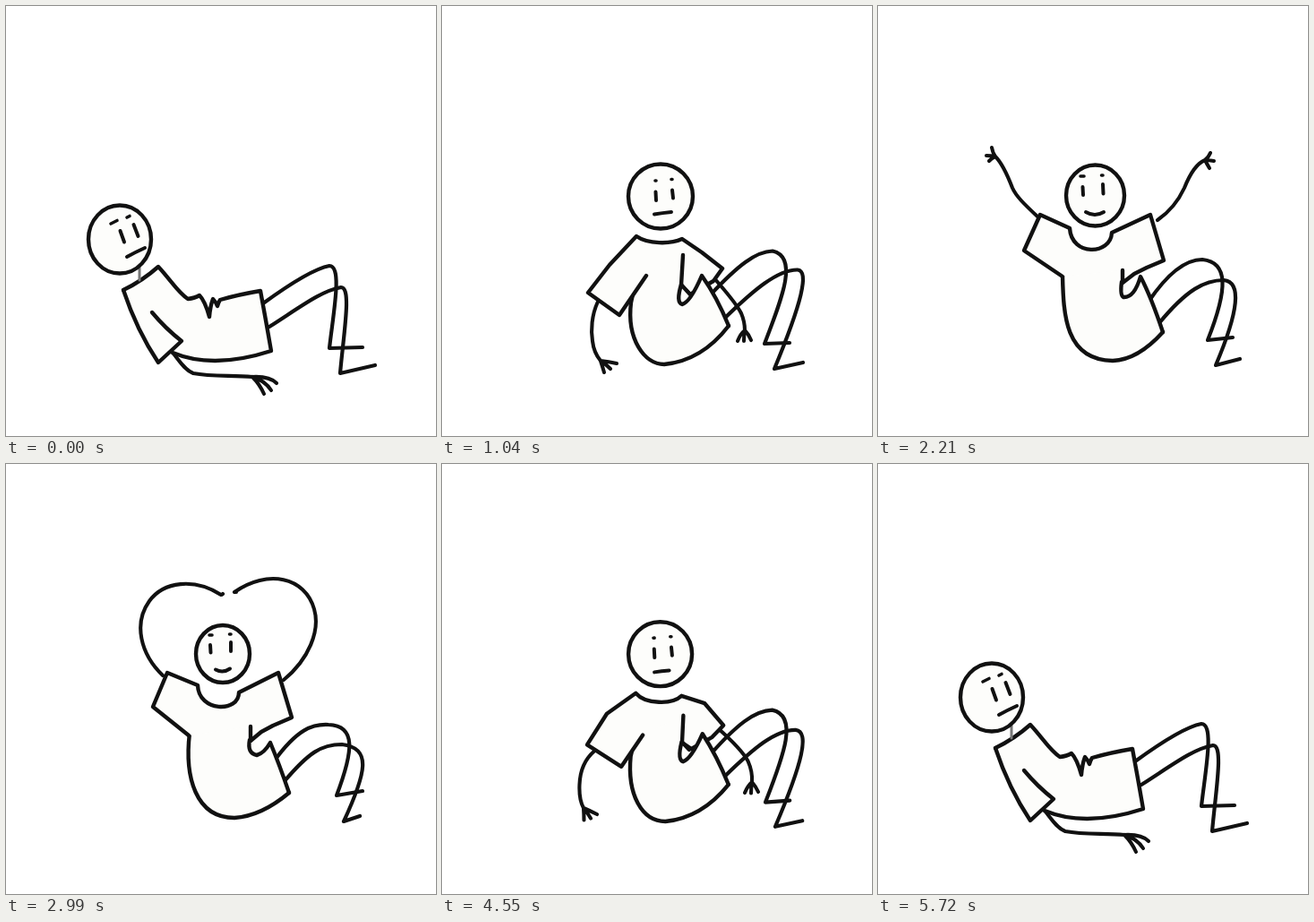
Recreate the animation shown at these times as an HTML page. Size 480x480 px, loop 5.85 s.

```html
<!DOCTYPE html>
<html lang="en">
<head>
<meta charset="utf-8">
<title>Sit-up heart</title>
<style>
html, body { margin: 0; width: 100%; height: 100%; overflow: hidden; background: #fff; }
svg { display: block; width: 100vw; height: 100vh; filter: blur(0.55px); }
path { fill: none; stroke: #111; stroke-width: 4.4; stroke-linecap: round; stroke-linejoin: round; }
.cloth { fill: #fdfdfb; }
</style>
</head>
<body>
<svg id="stage" viewBox="0 0 480 480"></svg>
<script>
const STEP = 130, CELS = 45, TOP = 22;

// Each part: path shapes by cel of the rising half; shapes of a part share one structure.
const parts = [
  { w: 4.2, keys: { // far leg
    0: "M287 332C320 308 345 293 361 290C376 290 365 345 361 382L398 381",
    5: "M303 318C325 292 345 281 364 282C388 286 376 330 358 377L394 377",
    8: "M300 322C330 290 350 274 369 273.5C398 280 380 325 360 377L388 376",
    13: "M303 327C325 296 345 280 367 279C397 284 390 320 365 380L389 374",
    17: "M302 330C325 296 345 283 362 283C391 286 391 315 368 373L396 370",
    21: "M299 332C325 296 342 290 360 291C391 292 388 320 369 370L398 365" } },
  { w: 4.2, keys: { // near leg
    0: "M294 358C330 335 352 318 374 314C386 314 377 365 373 410L412 401",
    5: "M314 344C345 328 360 310 382 312C404 316 394 345 375 403L405 397",
    8: "M315 349C348 317 375 294 397 294.5C410 296 402 330 371 405L403 398",
    13: "M314 351C345 320 362 306 386 306C413 310 405 345 376 404L399 399",
    17: "M313 355C345 316 365 306 386 306C406 308 403 340 377 401L404 394",
    21: "M310 355C338 322 352 313 375 313C409 317 402 345 377 399L395 393" } },
  { w: 4.1, keys: { // left arm and fingers
    0: "M186 387C193 395 199 406 209 410C230 414 252 412 275 414Q294 413 302 421M275 414Q289 418 296 429M275 414Q283 422 288 433",
    5: "M219 362C220 375 219 390 222 403C226 414 245 413 256 413Q265 412 272 411M256 413Q268 415 274 418M256 413Q260 419 266 423",
    8: "M174 330C167 345 166 362 168 374C169 383 172 390 177 396Q186 397 195 399M177 396Q183 400 188 405M177 396Q179 402 181 409",
    10: "M166 311C152 314 142 325 139 342C137 355 137 365 139 372Q144 377 151 383M139 372Q142 379 144 386M139 372Q138 379 136 386",
    13: "M163 260C152 251 138 244 126 244C112 252 111 275 112 297Q118 309 127 319M112 297Q115 309 119 321M112 297Q110 309 110 322",
    15: "M170 248C155 243 140 238 127 231C117 226 107 220 100 214Q97 208 94 206M100 214Q95 212 91 212M100 214Q97 217 94 220",
    17: "M178 235C162 220 154 212 150 203C145 190 139 176 131 168Q128 164 127 158M131 168Q126 167 121 167M131 168Q127 170 124 173",
    19: "M176 235C158 218 148 200 148 183C148 165 155 140 164 128Q166 121 167 116M164 128Q169 121 173 118M164 128Q171 125 177 123",
    21: "M175 236C150 212 142 178 160 153C176 131 210 127 240 146Q241 146 242 145M240 146Q241 146 242 145M240 146Q241 146 242 145",
    22: "M175 236C150 212 142 178 159 152C176 129 212 126 242 149Q243 149 244 148M242 149Q243 149 244 148M242 149Q243 149 244 148" } },
  { w: 4.1, keys: { // right arm and fingers, tucked behind the shirt at first
    5: "M266 346C268 348 270 349 271 350C272 352 273 354 273 356Q271 359 271 362M273 356Q273 359 274 362M273 356Q275 359 277 362",
    8: "M304 304C316 318 328 331 334 343C337 350 338 356 338 362Q333 366 330 374M338 362Q337 368 337 374M338 362Q342 366 345 373",
    10: "M311 285C326 295 342 308 349 320C354 331 355 340 354 348Q349 353 346 360M354 348Q353 355 353 361M354 348Q358 353 361 359",
    13: "M313 246C332 237 350 234 362 236C374 244 375 270 374 290Q366 296 360 302M374 290Q371 298 370 306M374 290Q377 297 378 303",
    15: "M314 243C330 238 344 232 356 226C368 220 380 214 390 208Q395 204 397 200M390 208Q397 207 402 208M390 208Q395 212 398 216",
    17: "M312 239C328 228 336 216 342 203C348 188 355 176 365 172Q369 169 371 164M365 172Q369 172 375 173M365 172Q367 176 370 181",
    19: "M311 240C332 222 344 200 345 180C345 160 338 140 330 128Q327 121 326 116M330 128Q324 121 320 118M330 128Q323 125 316 124",
    21: "M310 241C338 218 351 186 344 162C334 126 292 117 255 143Q256 143 257 143M255 143Q256 143 257 143M255 143Q256 143 257 143",
    22: "M310 241C338 218 350 186 343 162C333 124 290 116 252 146Q253 146 254 145M252 146Q253 146 254 145M252 146Q253 146 254 145" } },
  { cloth: 1, to: 5, keys: { // shirt from the side
    0: "M131 317Q152 307 170 291C184 306 192 320 203 327Q211 326 216 323Q222 329 227 347Q228 335 231 327Q234 330 236 335Q237 331 239 328Q260 322 284 318Q290 350 296 385C262 396 222 402 186 387",
    5: "M214 262Q235 266 257 262C255 290 254 320 260 334Q261 335 262 334Q263 333 264 332Q265 331 266 330Q267 329 268 328Q269 327 270 326Q281 315 292 302Q308 325 320 356C290 395 228 436 222 364" } },
  { cloth: 1, to: 5, keys: { // side sleeve
    0: "M131 317Q146 362 170 398L196 374Q178 360 163 342",
    5: "M214 262Q206 310 208 363L239 358Q239 325 235 301" } },
  { cloth: 1, from: 6, keys: { // front torso
    6: "M255 275L222 290L217 350C213 375 232 401 246 401Q283 396 320 357",
    8: "M262 272L220 290L211 331C206 372 226 400 248 400Q290 396 320 357",
    13: "M262 285L215 290L209 309C209 355 210 394 255 395Q290 390 319 361",
    17: "M262 285L215 290L206 301C207 345 209 395 262 396Q290 395 318 364",
    21: "M262 285L215 290L205 300C199 350 212 395 255 395Q285 393 316 367" } },
  { cloth: 1, from: 6, keys: { // shoulders, collar and sleeves
    6: "M233 301L222 360L196 352L206 295L215 260C228 265 248 265 262 261L272 268L288 284L284 300L272 314L262 306L263 278",
    8: "M228 301L198 345L163 320L187 289L217 257C230 266 255 266 268 260L290 275L313 293L303 307L277 322L267 312L269 278",
    13: "M209 309L209 309L158 287L172 238L214 251C215 278 266 280 265 254L306 236L319 287L296 296L284 302L272 307L271 292",
    17: "M206 302L206 302L163 273L181 233L214 248C216 280 260 278 261 253L304 233L319 284L300 292L286 299L273 309L273 295",
    21: "M204 303L204 303L164 271L180 233L214 247C215 277 260 278 260 255L304 233L319 283L298 292L285 299L273 309L273 293" } },
  { cloth: 1, from: 6, keys: { // sleeve corner, lap and hem
    6: "M272 314L261 310Q257 333 263 334Q271 329 291 301Q307 325 320 356",
    8: "M277 322L267 311Q261 331 268 333Q277 331 290 301Q307 325 320 357",
    13: "M272 307L270 306Q268 327 274 329Q282 324 294 302Q307 330 319 361",
    17: "M273 309L272 308Q270 323 274 325Q286 326 293 302Q305 325 318 364",
    21: "M273 309L272 308Q269 323 280 325Q288 323 295 311Q305 335 316 367" } },
  { w: 3, to: 2, ink: "#777", keys: { // neck
    0: "M149 290L149 306",
    5: "M236 250L236 262" } },
  { cloth: 1, keys: { // head
    0: oval(127, 260.5, 35, 38),
    5: oval(238.5, 212.5, 32, 36.5),
    8: oval(244, 212.5, 36, 36),
    13: oval(242, 211, 33.5, 35.5),
    17: oval(242.5, 211.5, 32.5, 34),
    21: oval(242, 212, 30, 32) } },
  { w: 4, keys: { // eyes
    0: "M127.5 251L132 263.5M142.5 244L147.5 257",
    5: "M244 205L245 217M257 204L258.5 216",
    8: "M238.5 207.5L239 217M257 205.5L258 214.5",
    13: "M230 203L230.5 212.5M252 201L252.5 211",
    17: "M228.5 202L229 211M251 199L251.5 209.5",
    21: "M228 202L228.5 210.5M251 199L251 209" } },
  { w: 3.6, keys: { // brows
    0: "M117 243L124 239.5M135 236L138 234.5",
    5: "M236 194L242 193.5M253 192.5L257 192",
    8: "M238 195L239 195M256 193.5L257 193.5",
    13: "M228 191L229.5 190.5M250 189.5L251.5 189.5",
    17: "M226 190L230 190M249.5 189L251 189",
    21: "M227 191L230 191M249.5 190L251 190" } },
  { w: 4, keys: { // mouth
    0: "M135 280Q144 275 155 270",
    5: "M240 234Q248 231 256 232.5",
    8: "M237 232.5Q246 231 256 230",
    13: "M237.5 232Q241 231.5 244 232",
    17: "M232 230Q242 236 252 230",
    21: "M234 229.5Q242 234 250 228.5" } }
];

function oval(x, y, rx, ry) {
  const a = rx * 0.552, b = ry * 0.552;
  return `M${x} ${y - ry}C${x + a} ${y - ry} ${x + rx} ${y - b} ${x + rx} ${y}` +
    `C${x + rx} ${y + b} ${x + a} ${y + ry} ${x} ${y + ry}` +
    `C${x - a} ${y + ry} ${x - rx} ${y + b} ${x - rx} ${y}` +
    `C${x - rx} ${y - b} ${x - a} ${y - ry} ${x} ${y - ry}Z`;
}

const NUM = /\d+(\.\d+)?/g;

function blend(a, b, t) {
  const end = b.match(NUM);
  let k = 0;
  return a.replace(NUM, n => (+n + (end[k++] - n) * t).toFixed(2));
}

function shape(keys, cel) {
  const at = Object.keys(keys).map(Number);
  const next = at.find(k => k > cel);
  const prev = at.filter(k => k <= cel).pop();
  if (prev === undefined) return keys[next];
  if (next === undefined) return keys[prev];
  let t = (cel - prev) / (next - prev);
  if (prev === 0) t = 1 - (1 - t) ** 1.5; // the sit-up slows near the top
  return blend(keys[prev], keys[next], t);
}

const stage = document.getElementById("stage");
for (const p of parts) {
  p.el = document.createElementNS("http://www.w3.org/2000/svg", "path");
  if (p.cloth) p.el.setAttribute("class", "cloth");
  if (p.w) p.el.style.strokeWidth = p.w;
  if (p.ink) p.el.style.stroke = p.ink;
  stage.append(p.el);
}

let shown = -1;
function draw(now) {
  const n = Math.floor(now / STEP) % CELS;
  const cel = n <= TOP ? n : CELS - 1 - n; // up, then the same cels back down
  if (cel !== shown) {
    shown = cel;
    for (const p of parts) {
      const on = cel >= (p.from ?? 0) && cel <= (p.to ?? TOP);
      p.el.setAttribute("d", on ? shape(p.keys, cel) : "");
    }
  }
}

const start = performance.now();
function tick() {
  draw(performance.now() - start);
  requestAnimationFrame(tick);
}
tick();
</script>
</body>
</html>
```
